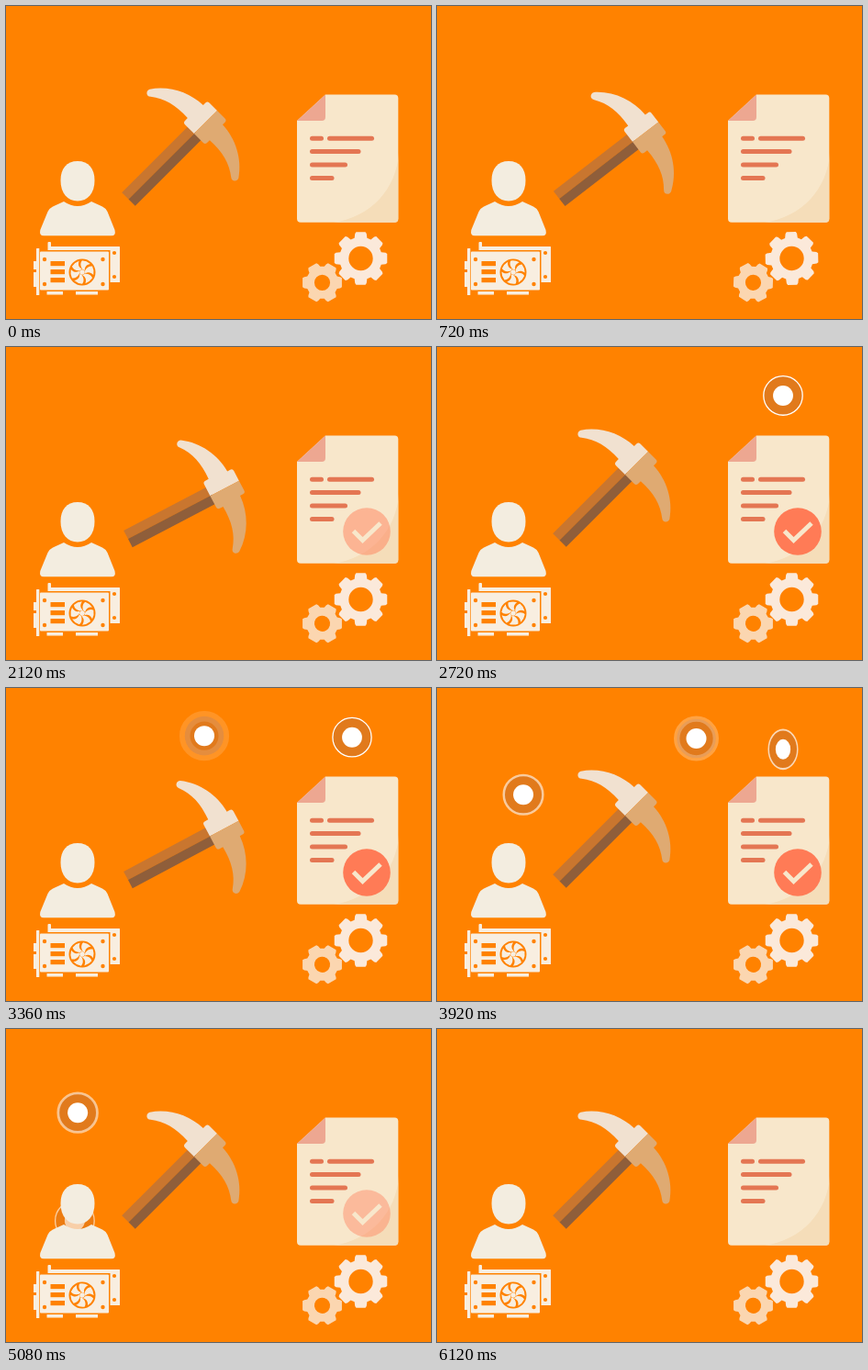
These frames come from a looping animation (463x341 px, 6.16 s). An HTML page with a canvas:

```html
<!DOCTYPE html>
<html lang="en">
<head>
<meta charset="utf-8">
<title>Mining rewards</title>
<style>
html, body { margin: 0; width: 100%; height: 100%; overflow: hidden; background: #ff8200; }
canvas { display: block; width: 463px; height: 341px; }
</style>
</head>
<body>
<canvas id="stage" width="463" height="341"></canvas>
<script>
const ctx = document.getElementById('stage').getContext('2d');
const LOOP = 6160, TAU = Math.PI * 2;
const BG = '#ff8200', CREAM = '#f3ede0', CARD = '#f8eee0', PAPER = '#f8e7cb';

const clamp = v => Math.max(0, Math.min(1, v));
const ramp = (t, a, b) => clamp((t - a) / (b - a));
const easeInOut = p => p < .5 ? 2 * p * p : 1 - 2 * (1 - p) ** 2;

function layer(draw) {
  ctx.save();
  draw();
  ctx.restore();
}
function fill(color, build, rule = 'nonzero') {
  ctx.fillStyle = color;
  ctx.beginPath();
  build();
  ctx.fill(rule);
}
function disc(x, y, r, color) {
  fill(color, () => ctx.arc(x, y, r, 0, TAU));
}
function box(x, y, w, h, color, r = 0) {
  fill(color, () => ctx.roundRect(x, y, w, h, r));
}
function stroke(points, color, width) {
  ctx.strokeStyle = color;
  ctx.lineWidth = width;
  ctx.beginPath();
  points.forEach(([x, y]) => ctx.lineTo(x, y));
  ctx.stroke();
}

// Coin route: time, x, y
const route = [
  [0, 377, 122], [100, 377, 100], [160, 377, 80], [220, 377, 67], [320, 377, 53],
  [480, 377, 51], [620, 365, 51], [870, 283, 55], [1020, 170, 51], [1170, 87, 58],
  [1280, 64, 74], [1380, 78, 91], [1520, 94, 116], [1680, 89, 152],
  [1850, 77, 192], [2000, 75, 208], [2300, 75, 208]
];
function slope(i, k) {
  const a = route[Math.max(0, i - 1)], b = route[Math.min(route.length - 1, i + 1)];
  return (b[k] - a[k]) / (b[0] - a[0]);
}
function along(t) {
  let i = 0;
  while (i < route.length - 2 && route[i + 1][0] < t) i++;
  const a = route[i], b = route[i + 1], d = b[0] - a[0], p = clamp((t - a[0]) / d);
  const q = p * p * (3 - 2 * p);
  return [1, 2].map(k =>
    a[k] + (b[k] - a[k]) * q
    + d * slope(i, k) * p * (1 - p) ** 2
    - d * slope(i + 1, k) * p * p * (1 - p));
}

function coin(t) {
  if (t < 0 || t > 2260) return;
  const [x, y] = along(t), [px, py] = along(t - 10);
  const speed = Math.max(0, Math.hypot(x - px, y - py) / 10 - .12);
  const narrow = 1 - .27 * Math.exp(-(((t - 210) / 55) ** 2));
  const fade = 1 - ramp(t, 1900, 2260);
  layer(() => {
    ctx.globalAlpha = fade;
    ctx.translate(x, y);
    ctx.scale(narrow, 1);
    disc(0, 0, 21.3, '#e17a1c');
    // the rim smears as the coin speeds up
    ctx.globalAlpha = fade / (1 + 8 * speed);
    ctx.strokeStyle = '#fff';
    ctx.lineWidth = 1.3 + 14 * speed;
    ctx.stroke();
    ctx.globalAlpha = fade;
    disc(0, 0, 11, '#fff');
  });
}

function user() {
  fill(CREAM, () => {
    ctx.moveTo(78, 169);
    ctx.bezierCurveTo(90, 169, 96.5, 177, 96.5, 190);
    ctx.bezierCurveTo(96.5, 204, 89, 212.5, 78, 212.5);
    ctx.bezierCurveTo(67, 212.5, 59.5, 204, 59.5, 190);
    ctx.bezierCurveTo(59.5, 177, 66, 169, 78, 169);
  });
  fill(CREAM, () => {
    ctx.moveTo(63, 213);
    ctx.quadraticCurveTo(78, 223, 93, 213);
    ctx.lineTo(105, 218.5);
    ctx.quadraticCurveTo(109, 220.5, 110.5, 224);
    ctx.lineTo(118.5, 244);
    ctx.quadraticCurveTo(120, 250.3, 115, 250.3);
    ctx.lineTo(41, 250.3);
    ctx.quadraticCurveTo(36, 250.3, 37.3, 244);
    ctx.lineTo(45.5, 224);
    ctx.quadraticCurveTo(47, 220.5, 51, 218.5);
    ctx.closePath();
  });
}

function card(t) {
  box(45.5, 257, 3.5, 12, CARD, 1);
  box(47, 262, 77, 39, CARD, .5);
  disc(118, 269, 2.1, BG);
  disc(118, 295, 2.1, BG);
  box(36, 266, 77.5, 45, BG);
  box(37, 267.5, 75, 42, CARD, 1);
  box(33, 264, 3.3, 51, CARD, .5);
  box(30, 278, 3, 9, CARD);
  box(30, 290, 3, 16, CARD);
  box(44.5, 311, 17.5, 3.5, CARD);
  box(76, 311, 24, 3.5, CARD);
  for (const x of [42, 105.5]) for (const y of [276, 303]) disc(x, y, 2.2, BG);
  for (const y of [278, 287, 296]) box(48.5, y, 15.5, 5.2, BG);
  disc(83, 290, 14.5, BG);
  layer(() => {
    ctx.translate(83, 290);
    ctx.rotate(t / LOOP * TAU * 4);
    for (let i = 0; i < 6; i++) {
      ctx.rotate(TAU / 6);
      fill(CARD, () => {
        ctx.moveTo(3, -1.5);
        ctx.bezierCurveTo(5, -5.5, 8, -7, 11, -6.5);
        ctx.quadraticCurveTo(13.3, -2, 12.3, 3);
        ctx.bezierCurveTo(9, -.5, 6, -.5, 3.2, 1.5);
      });
    }
    disc(0, 0, 2.8, CARD);
  });
}

function axeHalf(head, handle) {
  box(-10.3, -104, 10.3, 104, handle);
  fill(head, () => {
    ctx.moveTo(0, -136.5);
    ctx.lineTo(-12, -136.5);
    ctx.quadraticCurveTo(-15, -136.5, -15, -133.5);
    ctx.lineTo(-15, -130);
    ctx.bezierCurveTo(-36, -129, -56, -119, -68.5, -101);
    ctx.bezierCurveTo(-70.5, -97, -66, -92.5, -62, -96);
    ctx.bezierCurveTo(-50, -105.5, -36, -109, -17, -108);
    ctx.lineTo(-17, -104);
    ctx.quadraticCurveTo(-17, -101, -14, -101);
    ctx.lineTo(0, -101);
  });
}
function pickaxe(t) {
  const p = t % (LOOP / 5);
  const swing = p < 820 ? ramp(p, 560, 820) ** 2 : 1 - easeInOut(ramp(p, 820, 1150));
  layer(() => {
    ctx.translate(138, 208);
    ctx.rotate(swing * 19 * Math.PI / 180);
    ctx.translate(-4.5, 2.5);
    ctx.rotate(Math.PI / 4);
    axeHalf('#f1e1d0', '#c9762f');
    ctx.scale(-1, 1);
    axeHalf('#dfaa72', '#8f5e3a');
  });
}

function paper(t) {
  const outline = () => {
    ctx.moveTo(348, 96.5);
    ctx.arcTo(427.3, 96.5, 427.3, 235.7, 4);
    ctx.arcTo(427.3, 235.7, 317, 235.7, 4);
    ctx.arcTo(317, 235.7, 317, 125, 4);
    ctx.lineTo(317, 125);
    ctx.closePath();
  };
  fill(PAPER, outline);
  layer(() => {
    ctx.beginPath();
    outline();
    ctx.clip();
    fill('#f5ddb9', () => {
      ctx.moveTo(428, 160);
      ctx.bezierCurveTo(425, 203, 393, 234, 348, 237);
      ctx.lineTo(428, 237);
    });
  });
  fill('#eda791', () => {
    ctx.moveTo(317, 125);
    ctx.lineTo(348, 96.5);
    ctx.arcTo(348, 125, 317, 125, 4);
    ctx.closePath();
  });
  ctx.lineCap = 'round';
  for (const [a, b, y] of [[333.5, 343.5, 144.2], [352.5, 398.5, 144.2],
    [333.5, 384, 158.5], [333.5, 369.5, 173], [333.5, 355, 187.5]])
    stroke([[a, y], [b, y]], '#e47653', 5);
  const shown = ramp(t, 1960, 2300) * (1 - ramp(t, 4840, 5250));
  if (shown) layer(() => {
    ctx.globalAlpha = shown;
    disc(393, 201, 25.8, '#ff7b56');
    ctx.globalAlpha = 1;
    ctx.lineCap = 'butt';
    stroke([[378.5, 200.5], [388.5, 210.5], [408, 192]], PAPER, 5);
  });
}

function gear(x, y, teeth, outer, root, hole, angle, color) {
  const step = TAU / teeth;
  layer(() => {
    ctx.translate(x, y);
    ctx.rotate(angle);
    fill(color, () => {
      for (let i = 0; i < teeth; i++) {
        for (const [r, d] of [[root, -.38], [outer - 1.5, -.29], [outer, -.22],
          [outer, .22], [outer - 1.5, .29], [root, .38]]) {
          const a = (i + d) * step;
          ctx.lineTo(r * Math.cos(a), r * Math.sin(a));
        }
      }
      ctx.closePath();
      ctx.moveTo(hole, 0);
      ctx.arc(0, 0, hole, 0, TAU);
    }, 'evenodd');
  });
}

function draw(t) {
  ctx.fillStyle = BG;
  ctx.fillRect(0, 0, 463, 341);
  const turn = easeInOut(ramp(t, 640, 1940)) * Math.PI;
  for (const start of [2400, 3050, 3700]) coin(t - start);
  user();
  card(t);
  pickaxe(t);
  paper(t);
  gear(344.5, 301.3, 6, 22, 17.6, 8.6, turn * 8 / 6, '#fbd6b0');
  gear(386.5, 275, 8, 29.2, 23.3, 13.2, -turn, '#fbe9da');
}

function tick() {
  draw(performance.now() % LOOP);
  requestAnimationFrame(tick);
}
tick();
</script>
</body>
</html>
```
